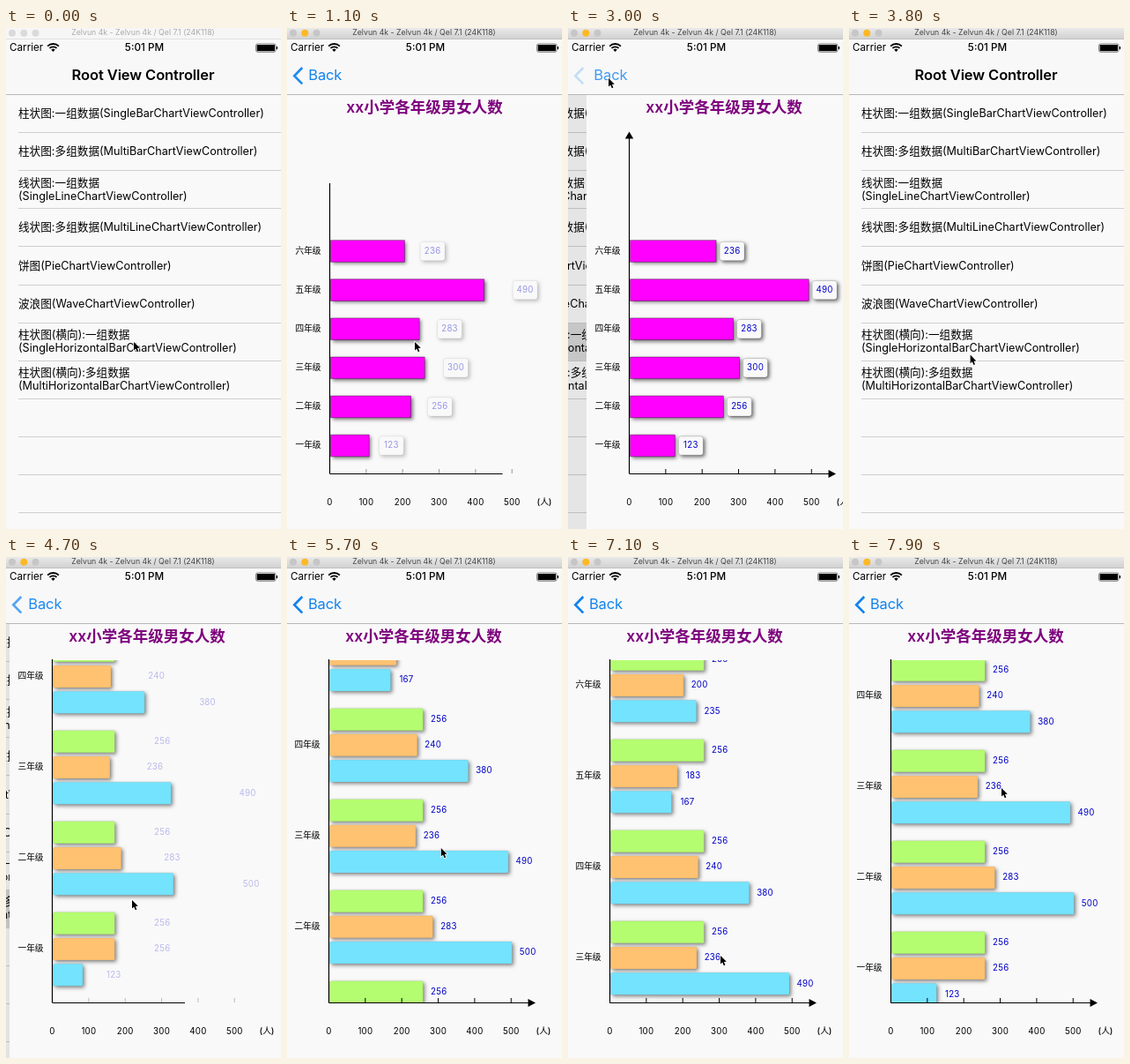
An HTML page with a canvas for the animation above (8000 ms loop, 312 by 568 pixels).

```html
<!DOCTYPE html>
<html lang="zh">
<head>
<meta charset="utf-8">
<title>Chart demo</title>
<style>
html, body { margin: 0; width: 100%; height: 100%; overflow: hidden; background: #f8f8f8; }
canvas { display: block; width: 312px; height: 568px; }
</style>
</head>
<body>
<canvas id="stage"></canvas>
<script>
const W = 312, H = 568, LOOP = 8000, STEP = 100;
const PUSH_1 = 670, POP = 2976, PUSH_2 = 4370;
const AXIS_X = 48, AXIS_Y = 505.5, TOP = 117, UNIT = 0.4135;
const FONT = "Inter, 'Noto Sans CJK SC', 'Noto Sans CJK', sans-serif";
const PAPER = '#f9f9f9', BLUE = '#1283f0', INK = '#0000c8';

const ROWS = [
  ['柱状图:一组数据(SingleBarChartViewController)'],
  ['柱状图:多组数据(MultiBarChartViewController)'],
  ['线状图:一组数据', '(SingleLineChartViewController)'],
  ['线状图:多组数据(MultiLineChartViewController)'],
  ['饼图(PieChartViewController)'],
  ['波浪图(WaveChartViewController)'],
  ['柱状图(横向):一组数据', '(SingleHorizontalBarChartViewController)'],
  ['柱状图(横向):多组数据', '(MultiHorizontalBarChartViewController)']
];
const GRADES = [...'一二三四五六'].map(c => c + '年级');
const SINGLE = [123, 256, 300, 283, 490, 236];
const MULTI = [[256, 256, 123], [256, 283, 500], [256, 236, 490],
               [256, 240, 380], [256, 183, 167], [256, 200, 235]];
const COLORS = ['#b4fd70', '#fec270', '#74e3fe'];

// [time, values...]
const CURSOR = [[0, 145, 356], [1900, 145, 356], [2700, 46, 57], [3200, 46, 57], [3900, 143, 389],
  [4750, 143, 389], [5250, 174, 245], [5350, 174, 245], [6150, 176, 454], [7100, 173, 452],
  [7200, 173, 452], [7900, 173, 262]];
const SCROLL = [[5350, 0], [6200, 211], [7100, 216], [7200, 216], [7900, 22]];

const canvas = document.getElementById('stage');
const ctx = canvas.getContext('2d');
const dpr = window.devicePixelRatio || 1;
canvas.width = W * dpr;
canvas.height = H * dpr;

const clamp = v => Math.max(0, Math.min(1, v));
const smooth = v => v * v * (3 - 2 * v);

function spring(ms) {
  const x = Math.max(0, ms) * 0.01826;
  return 1 - (1 + x) * Math.exp(-x);
}

function track(keys, t) {
  if (t <= keys[0][0]) return keys[0].slice(1);
  const i = keys.findIndex(k => k[0] >= t);
  if (i < 0) return keys[keys.length - 1].slice(1);
  const a = keys[i - 1], b = keys[i], k = smooth((t - a[0]) / (b[0] - a[0]));
  return a.slice(1).map((v, j) => v + (b[j + 1] - v) * k);
}

function text(str, x, y, size, { color = '#000', weight = 400, align = 'center', gap = 0 } = {}) {
  ctx.font = `${weight} ${size}px ${FONT}`;
  ctx.letterSpacing = gap + 'px';
  ctx.textAlign = align;
  ctx.textBaseline = 'middle';
  ctx.fillStyle = color;
  ctx.fillText(str, x, y);
}

function rect(x, y, w, h, color) {
  ctx.fillStyle = color;
  ctx.fillRect(x, y, w, h);
}

function poly(points, color) {
  ctx.beginPath();
  points.forEach(p => ctx.lineTo(...p));
  ctx.closePath();
  ctx.fillStyle = color;
  ctx.fill();
}

function line(points, color, width) {
  ctx.beginPath();
  points.forEach(p => ctx.lineTo(...p));
  ctx.strokeStyle = color;
  ctx.lineWidth = width;
  ctx.stroke();
}

function disc(x, y, r, color) {
  ctx.beginPath();
  ctx.arc(x, y, r, 0, 7);
  ctx.fillStyle = color;
  ctx.fill();
}

function group(draw, alpha = 1) {
  ctx.save();
  ctx.globalAlpha = alpha;
  draw();
  ctx.restore();
}

// The face stays opaque; only shadow and edge follow their own alpha.
function shadowBox(x, y, w, h, radius, color, shade, edge) {
  if (w <= 0) return;
  group(() => {
    ctx.shadowColor = `rgba(0,0,0,${shade})`;
    ctx.shadowOffsetX = ctx.shadowOffsetY = 2 * dpr;
    ctx.shadowBlur = 4 * dpr;
    ctx.beginPath();
    ctx.roundRect(x, y, w, h, radius);
    ctx.fillStyle = color;
    ctx.fill();
    ctx.shadowColor = 'transparent';
    ctx.strokeStyle = `rgba(0,0,0,${edge})`;
    ctx.lineWidth = 0.6;
    ctx.stroke();
  });
}

function list(selected, strength) {
  rect(0, 75, W, H, PAPER);
  const rowY = i => 75.5 + 43.1 * i;
  if (selected >= 0) group(() => rect(0, rowY(selected), W, 43, '#d5d5d5'), strength);
  for (let i = 0; i < 12; i++) {
    const y = rowY(i);
    if (i) rect(14, Math.round(y - 0.5), W, 1, '#cfcfd2');
    const lines = ROWS[i] || [];
    lines.forEach((s, j) =>
      text(s, 14, y + 21.8 + (j - (lines.length - 1) / 2) * 15.3, 12.64, { align: 'left' }));
  }
}

function axes(grow, fade, done, yLength, scroll) {
  const x0 = AXIS_X - 0.5;
  line([[x0, AXIS_Y], [x0 + 228 * grow, AXIS_Y]], '#000', 1.2);
  if (done) poly([[282, AXIS_Y], [273.5, AXIS_Y - 4.5], [273.5, AXIS_Y + 4.5]], '#000');
  for (let i = 0; i < 6; i++) {
    const x = x0 + i * 100 * UNIT;
    if (i) group(() => line([[x, 500], [x, 505]], '#000', 1), fade);
    text(String(i * 100), x, 538, 9.72, { gap: 0.2 });
  }
  text('(人)', 291, 538, 9.72, { weight: 500 });
  group(() => {
    ctx.beginPath();
    ctx.rect(0, TOP - 1, W, AXIS_Y - TOP + 1);
    ctx.clip();
    const base = AXIS_Y + scroll, end = base - yLength;
    line([[x0, base], [x0, base - yLength * grow]], '#000', 1.2);
    if (done) poly([[x0, end - 5], [x0 - 4.7, end + 3], [x0 + 4.7, end + 3]], '#000');
  });
}

function singleChart(grow, fade) {
  SINGLE.forEach((v, i) => {
    const y = 473.5 - 44.1 * i, end = AXIS_X + v * UNIT;
    text(GRADES[i], 23, y, 9.72);
    shadowBox(AXIS_X + 0.5, y - 12.3, v * UNIT * grow, 24.6, 0, '#ff00ff', 0.5, 0.6);
    shadowBox(end + 4.5, y - 10.7, 28, 21.4, 3, PAPER, 0.6 * fade, 0.28 * fade);
    group(() => text(String(v), end + 18.5, y, 9.72, { color: INK, gap: 0.2 }), fade);
  });
}

function multiChart(grow, fade, scroll) {
  ctx.beginPath();
  ctx.rect(0, TOP, W, AXIS_Y - TOP);
  ctx.clip();
  MULTI.forEach((values, i) => {
    const mid = 444.5 - 103 * i + scroll;
    text(GRADES[i], 23, mid - 0.5, 9.72);
    values.forEach((v, j) => {
      const y = mid + (j - 1) * 29.2;
      shadowBox(AXIS_X + 0.5, y - 12.5, v * UNIT * grow, 25, 1.5, COLORS[j], 0.48, 0.1);
      group(() => text(String(v), AXIS_X + v * UNIT + 18.4, y, 9.72, { color: INK, gap: 0.2 }), fade);
    });
  });
}

function chartPage(t) {
  const multi = t >= PUSH_2;
  const age = (t - (multi ? PUSH_2 : PUSH_1)) / 1000;
  const grow = clamp(age / 0.5), fade = smooth(clamp(age));
  const scroll = multi ? track(SCROLL, t)[0] : 0;
  rect(-1, 75, W + 1, H, PAPER);
  text('xx小学各年级男女人数', 155, 90.5, 17.5, { color: '#7d007d', weight: 600 });
  group(() => multi ? multiChart(grow, fade, scroll) : singleChart(grow, fade));
  axes(grow, fade, grow === 1, multi ? 700 : 383, scroll);
}

function navBar(shown) {
  rect(0, 12, W, 63, '#f8f8f8');
  rect(0, 75, W, 1, '#b8b8b8');
  group(() => text('Root View Controller', 155.5 - 112 * shown, 54.5, 16.5, { weight: 600, gap: -0.1 }), (1 - shown) ** 2);
  group(() => text('Back', 43 + 75 * (1 - shown), 54.5, 16.5, { color: BLUE, gap: -0.1 }), shown ** 3);
  group(() => line([[17.3, 45], [8.3, 54.2], [17.3, 63.4]], BLUE, 2.7), shown ** 20);
}

function statusBar() {
  text('Carrier', 4, 22.8, 11.7, { align: 'left' });
  text('5:01 PM', 157, 22.8, 11.7, { weight: 500 });
  [9, 5.7].forEach(r => {
    ctx.beginPath();
    ctx.arc(53.5, 27, r, -Math.PI * 0.75, -Math.PI * 0.25);
    ctx.strokeStyle = '#000';
    ctx.lineWidth = 1.8;
    ctx.stroke();
  });
  poly([[53.5, 27], [51.2, 24.5], [53.5, 23.6], [55.8, 24.5]], '#000');
  ctx.beginPath();
  ctx.roundRect(283.5, 17.9, 22.5, 9.4, 2);
  ctx.strokeStyle = '#555';
  ctx.lineWidth = 0.7;
  ctx.stroke();
  rect(284.6, 19, 20.3, 7.2, '#000');
  rect(306.7, 21, 1.3, 3.2, '#000');
}

function titleBar(active) {
  let fill = '#f6f6f6';
  if (active) {
    fill = ctx.createLinearGradient(0, 0, 0, 12);
    fill.addColorStop(0, '#e9e9e9');
    fill.addColorStop(1, '#d2d2d2');
  }
  rect(0, 0, W, 12, fill);
  rect(0, 12, W, 0.8, active ? '#b4b4b4' : '#dcdcdc');
  [7, 20.3, 33.5].forEach((x, i) =>
    disc(x, 5.7, 4, active ? (i === 1 ? '#fdb924' : '#c6c6c6') : '#dadada'));
  text('Zelvun 4k - Zelvun 4k / Qel 7.1 (24K118)', 155.5, 5.8, 8.75, { color: active ? '#444' : '#aaa' });
}

function cursor(t) {
  const [x, y] = track(CURSOR, t);
  group(() => {
    ctx.translate(x, y);
    ctx.beginPath();
    [[0, 0], [0, 9.6], [2.2, 7.6], [3.8, 11.3], [5.4, 10.6], [3.9, 7.1], [6.8, 6.8]].forEach(p => ctx.lineTo(...p));
    ctx.closePath();
    ctx.strokeStyle = '#fff';
    ctx.lineWidth = 1.4;
    ctx.stroke();
    ctx.fillStyle = '#000';
    ctx.fill();
  });
}

function draw(t) {
  const shown = t < POP ? spring(t - PUSH_1) : t < 4000 ? 1 - spring(t - POP) : spring(t - PUSH_2);
  const selected = t >= 4250 ? 7 : t >= 600 ? 6 : -1;
  const strength = t >= POP && t < 4250 ? shown : 1;
  const pageX = Math.round(W * (1 - shown));
  ctx.setTransform(dpr, 0, 0, dpr, 0, 0);
  rect(0, 0, W, H, PAPER);
  if (pageX > 0) {
    group(() => {
      ctx.translate(-94 * shown, 0);
      list(selected, strength);
    });
    group(() => rect(0, 75, pageX, H, '#000'), 0.09 * shown);
  }
  if (shown > 0.001) group(() => {
    ctx.translate(pageX, 0);
    chartPage(t);
  });
  navBar(shown);
  statusBar();
  titleBar(t >= 300);
  cursor(t);
}

function tick() {
  draw(Math.floor(performance.now() % LOOP / STEP) * STEP);
  requestAnimationFrame(tick);
}
tick();
</script>
</body>
</html>
```
